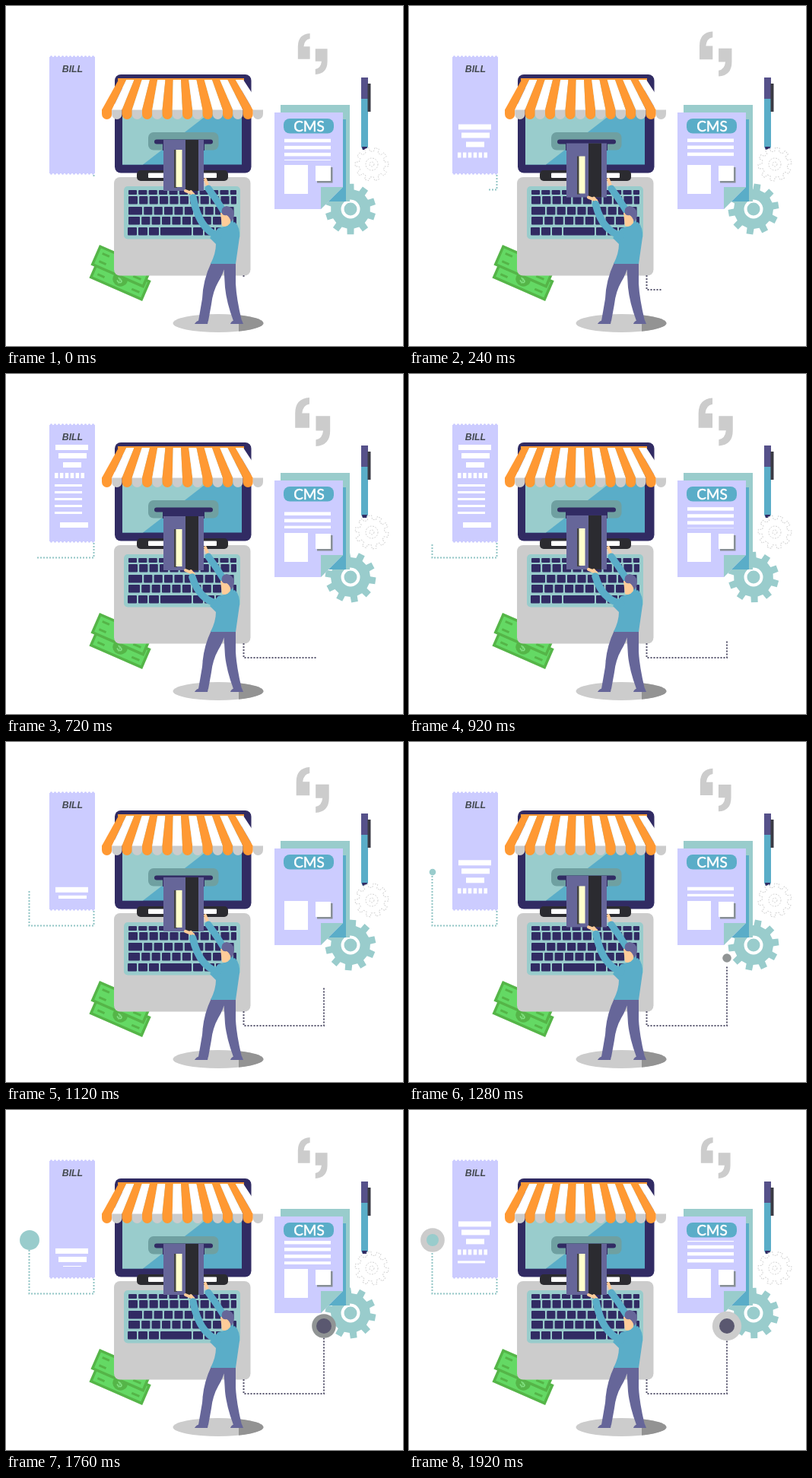
These frames come from a looping animation (522 px wide and 447 px high, 1.96 s). An HTML page:

```html
<!DOCTYPE html>
<html lang="en">
<head>
<meta charset="utf-8">
<title>Online shop</title>
<style>
html, body { margin: 0; width: 100%; height: 100%; overflow: hidden; background: #fff; }
svg { display: block; width: 522px; height: 447px; }
.lilac { fill: #ccf; }
.mint { fill: #9cc; }
.blue { fill: #5aadc8; }
.navy { fill: #312b63; }
.violet { fill: #669; }
.black { fill: #2b2b30; }
.grey { fill: #ccc; }
.white { fill: #fff; }
.skin { fill: #fc9; }
.limb { fill: none; stroke-linecap: round; }
</style>
</head>
<body>
<svg viewBox="0 0 522 447">
  <defs>
    <clipPath id="paper"><rect x="57" y="66" width="60" height="140"/></clipPath>
    <clipPath id="column"><rect x="360" y="172" width="75" height="31"/></clipPath>
    <clipPath id="slot"><rect x="200" y="176" width="70" height="100"/></clipPath>
    <clipPath id="shade"><path d="M306 400h40v30h-40z"/></clipPath>
    <g id="note">
      <rect width="76" height="29" fill="#55b548"/>
      <rect x="3.5" y="3.5" width="69" height="22" fill="#64d964"/>
      <path d="M8 9h10M8 20h10M57 9h11M57 20h11" stroke="#55b548" stroke-width="3"/>
      <ellipse cx="38" cy="14.500" rx="10" ry="9" fill="#55b548"/>
      <text x="38" y="19.500" font-family="Liberation Sans, sans-serif" font-size="14" font-weight="bold" text-anchor="middle" fill="#80e080">$</text>
    </g>
    <path id="quote" d="M384.500 70V54Q384.500 38 400 37V44Q393 45 392 54H400V70z"/>
  </defs>

  <g id="quotes" class="grey">
    <use href="#quote"/>
    <use href="#quote" transform="rotate(180 403.5 63.5)"/>
  </g>

  <g id="bill">
    <rect class="lilac" x="57" y="67" width="60" height="153"/>
    <path d="M59.5 67H117M59.5 220H117" stroke="#ccf" stroke-width="3.5" stroke-linecap="round" stroke-dasharray="0 5"/>
    <text x="73.8" y="86.5" font-family="Liberation Sans, sans-serif" font-size="12.3" font-weight="bold" font-style="italic" fill="#444a50">BILL</text>
    <g clip-path="url(#paper)"><g id="receipt" class="white"></g></g>
  </g>

  <g transform="translate(121 331) rotate(23.5)"><use href="#note"/></g>
  <g transform="translate(123 314) rotate(23.5)"><use href="#note"/></g>

  <rect class="navy" x="143" y="90" width="179.5" height="129.500" rx="8"/>
  <rect class="blue" x="153" y="98" width="157" height="110.5"/>
  <path class="mint" d="M153 98H310V108L180 208.500H153z"/>
  <g id="awning"></g>
  <rect x="187" y="166" width="92.500" height="23.5" rx="7" fill="#6fa0a1"/>
  <rect class="navy" x="195" y="175.500" width="77" height="6" rx="3"/>

  <rect class="grey" x="142" y="225" width="179.5" height="129.5" rx="8"/>
  <rect class="black" x="172" y="216" width="120" height="14" rx="5"/>
  <rect class="white" x="187" y="219.5" width="90" height="6.5" rx="1"/>
  <rect class="mint" x="155" y="237" width="153" height="69.500" rx="5"/>
  <g id="keys" class="navy"></g>

  <rect class="navy" x="206" y="176" width="55" height="14"/>
  <g clip-path="url(#slot)">
    <g id="card">
      <rect class="violet" x="207" y="172" width="53" height="71"/>
      <rect class="black" x="236" y="172" width="17" height="71"/>
      <rect x="221" y="189" width="4" height="50" fill="#444"/>
      <rect x="223.5" y="189" width="8" height="49" fill="#ffc"/>
    </g>
  </g>

  <ellipse class="grey" cx="279" cy="417" rx="59.5" ry="12"/>
  <ellipse cx="279" cy="417" rx="59.5" ry="12" fill="#939393" clip-path="url(#shade)"/>

  <g id="man">
    <path class="limb" d="M265 236L262 228" stroke="#fc9" stroke-width="4"/>
    <path class="limb" d="M299 293Q286 267 266 240" stroke="#5aadc8" stroke-width="9"/>
    <path class="violet" d="M286 337H302V365Q303 385 310 414H299Q290 390 288 370zM270 337H289Q286 352 279 363Q272 375 270 392L266 414H253L258 385Q259 360 270 337z"/>
    <path class="violet" d="M248 418Q250 414 255 413H266L265 418zM295 418Q296 414 301 413H310L312 418z"/>
    <path class="blue" d="M279 292Q290 290 301 284Q308 291 307 304L302 339H269Q276 325 276 313L268 305z"/>
    <path class="skin" d="M282 272H296L295 285Q290 292 284 289z"/>
    <path class="violet" d="M284 273Q282 264 290 263Q299 264 300 273Q300 280 296 284Q294 277 290 275Q286 276 284 273z"/>
    <path id="hand" class="limb" stroke="#fc9" stroke-width="4"/>
    <path id="arm" class="limb" stroke="#5aadc8" stroke-width="9.5"/>
  </g>

  <path id="bigGear" class="mint"/>
  <circle cx="453" cy="267" r="10.5" fill="none" stroke="#fff" stroke-width="4"/>
  <path class="mint" d="M361 130H452V257H361z"/>
  <path class="blue" d="M361 149H447V257H361z"/>
  <path class="lilac" d="M353 140H443V238L414 267H353z"/>
  <path class="mint" d="M414 267V238H443z"/>
  <rect class="blue" x="365" y="148" width="66" height="19.5" rx="8"/>
  <text x="398.500" y="164.6" font-family="Lato, sans-serif" font-size="19" text-anchor="middle" fill="#fff" stroke="#fff" stroke-width=".5">CMS</text>
  <g clip-path="url(#column)"><g id="lines" class="white"></g></g>
  <path class="white" d="M366 209h31v38h-31z"/>
  <path d="M409 212h20.5v20.5H409z" fill="#878f94"/>
  <path class="white" d="M407 210h20v20h-20z"/>

  <path class="blue" d="M467 120h9v65l-2 4h-5l-2-4z"/>
  <path d="M467 94h9v28h-9z" fill="#56518a"/>
  <path class="navy" d="M468 185h7l-1 4h-5z"/>
  <path d="M475.5 102h4v37h-4z" fill="#3b3b44"/>

  <g fill="#fff" stroke="#d4d4d4" stroke-dasharray="2 1.5">
    <path id="smallGear"/>
    <circle cx="481" cy="208" r="8"/>
    <circle cx="481" cy="208" r="3"/>
  </g>

  <path id="leftTrail" d="M115.500 222V241.500H30.500V171" fill="none" stroke="#92c5c5" stroke-width="2"/>
  <path id="rightTrail" d="M312.500 354V373H418V284" fill="none" stroke="#5a5870" stroke-width="2"/>
  <circle id="leftOuter" cx="31" cy="171"/>
  <circle id="leftInner" class="mint" cx="31" cy="171"/>
  <circle id="rightOuter" cx="418" cy="284"/>
  <circle id="rightInner" cx="418" cy="284" fill="#5a5870"/>
</svg>
<script>
const LOOP = 1960, STEP = 40;
const $ = id => document.getElementById(id);
const set = (id, attrs) => { for (const k in attrs) $(id).setAttribute(k, attrs[k]); };
const clamp = x => Math.min(1, Math.max(0, x));
const ramp = (t, a, b) => clamp((t - a) / (b - a));
const smooth = x => x * x * (3 - 2 * x);
const box = (x, y, w, h, r = 0) => `<rect x="${x}" y="${y}" width="${w}" height="${h}" rx="${r}"/>`;
const mix = (a, b, p) => `rgb(${a.map((v, i) => Math.round(v + (b[i] - v) * p))})`;

function gear(cx, cy, outer, inner, teeth) {
  const pts = [], pitch = 2 * Math.PI / teeth;
  for (let i = 0; i < teeth; i++)
    for (const [f, r] of [[-.28, inner], [-.21, outer], [.21, outer], [.28, inner]]) {
      const a = (i + f) * pitch;
      pts.push([cx + r * Math.cos(a), cy + r * Math.sin(a)].map(v => v.toFixed(2)));
    }
  return 'M' + pts.join('L') + 'z';
}

function awning() {
  const n = 16, top = i => 148 + i * 164 / n, low = i => 126 + i * 212 / n;
  let out = '<path d="M147 95H313V98H147z" fill="#f93"/>';
  for (let i = 0; i < n; i++) {
    const a = low(i), b = low(i + 1), [cloth, hem] = i % 2 ? ['#fff', '#ccc'] : ['#f93', '#f93'];
    out += `<path d="M${a} 136V142A6.6 7 0 0 0 ${b} 142V136z" fill="${hem}"/>` +
      `<path d="M${top(i)} 97H${top(i + 1)}L${b} 136.5H${a}z" fill="${cloth}"/>`;
  }
  return out;
}

function keys() {
  let out = '';
  // Each row: top, height, width of its first key
  for (const [y, h, first] of [[242, 6, 11], [250, 10.5, 12], [264, 10.5, 18], [277, 10.5, 15]]) {
    let x = 161;
    for (let w = first; x < 300; w = 11.2) {
      out += box(x, y, Math.min(w, 303 - x), h, 1);
      x += w + 2.2;
    }
  }
  for (const [x, w] of [[160, 12], [174, 12], [188, 13], [203, 41], [246, 13], [261, 13], [276, 12], [290, 13]])
    out += box(x, 291, w, 10.5, 1);
  return out;
}

function receipt() {
  let out = box(65, 0, 43, 7) + box(69, 11, 37, 7) + box(75, 23, 24, 7) + box(71, 102, 37, 7);
  for (let i = 0; i < 6; i++) out += box(64 + i * 6.9, 37, 4.5, 7);
  for (let i = 0; i < 5; i++) out += box(64, 52 + i * 9, 36, 3);
  return out;
}

function lines() {
  let out = '';
  for (let i = 0; i < 9; i++) out += box(366, i * 9.1 - 2, 61, 4.5);
  return out;
}

$('awning').innerHTML = awning();
$('keys').innerHTML = keys();
$('receipt').innerHTML = receipt();
$('lines').innerHTML = lines();
set('bigGear', { d: gear(453, 267, 33.5, 26, 10) });
set('smallGear', { d: gear(481, 208, 22, 17, 10) });

// Shows only the first len pixels of a dotted path
const trail = (id, len) =>
  set(id, { 'stroke-dasharray': '2 2 '.repeat(Math.max(1, Math.floor(len / 4))) + '0 999' });

const scroll = (id, y) => set(id, { transform: `translate(0 ${y})` });

function draw(t) {
  const pulse = 1.02 + .19 * Math.sin(Math.PI * Math.min(1, t / 1400));
  set('quotes', { transform: `translate(403.2 63) scale(${pulse}) translate(-403.5 -63.5)` });

  const printed = t < 1040 ? 8 : t < 1640 ? 1047 : 1647;
  scroll('receipt', Math.max(93, 207 - .222 * (t - printed)));

  const typed = t <= 440 ? 1120 - LOOP : t < 1120 ? 440 : 1120;
  scroll('lines', 205 - .077 * (t - typed));

  const pull = 15 * (smooth(ramp(t, 0, 440)) - smooth(ramp(t, 840, 1330)));
  const y = 243 + pull;
  scroll('card', pull);
  set('arm', { d: `M279 302Q254 ${294 + pull * .2} ${246 - pull * .07} ${y + 9}` });
  set('hand', { d: `M247 ${y + 6}L243 ${y + 1}M246 ${y + 4}L236 ${y}` });

  const turn = 72 * t / LOOP;
  set('bigGear', { transform: `rotate(${18 + turn} 453 267)` });
  set('smallGear', { transform: `rotate(${-turn} 481 208)` });

  trail('leftTrail', 3 + .134 * t);
  trail('rightTrail', 3 + .158 * t);

  const on = t > 1200, fade = ramp(t, 1760, 1900);
  set('leftOuter', { r: on ? .018 * (t - 1040) : 0, fill: mix([153, 204, 204], [204, 204, 204], fade) });
  set('leftInner', { r: t > 1760 ? 8 : 0 });
  set('rightOuter', { r: on ? .0208 * (t - 1000) : 0, fill: mix([144, 148, 148], [204, 204, 204], fade) });
  set('rightInner', { r: 10 * ramp(t, 1440, 1720) });
}

const begin = performance.now();
function tick() {
  const t = (performance.now() - begin) % LOOP;
  draw(Math.floor(t / STEP) * STEP);
  requestAnimationFrame(tick);
}
tick();
</script>
</body>
</html>
```
